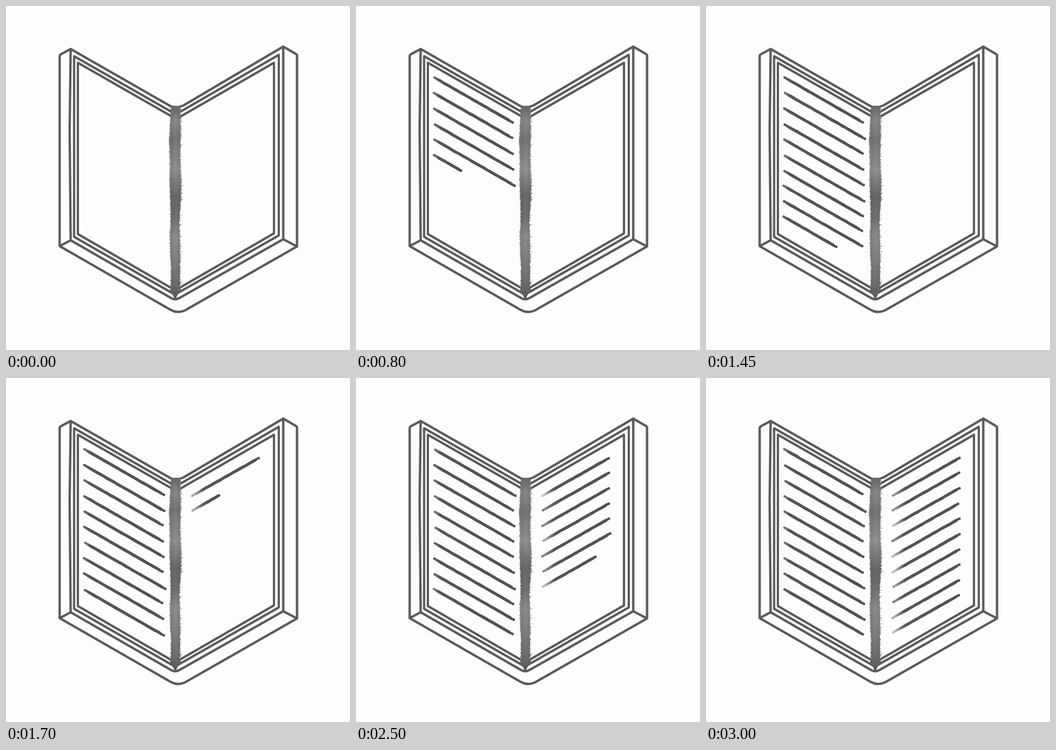
Animation of 500 by 500 pixels, one loop 3050 ms. Source, as an HTML page with a canvas:

```html
<!DOCTYPE html>
<html lang="en">
<head>
<meta charset="utf-8">
<title>Book being written</title>
<style>
  html, body { margin: 0; width: 100%; height: 100%; overflow: hidden; background: #fdfdfd; }
  canvas { display: block; width: 500px; height: 500px; }
</style>
</head>
<body>
<canvas id="stage" width="500" height="500"></canvas>
<script>
const SIZE = 500, STEP = 50, LOOP = 3050;
const PAPER = '#fdfdfd', INK = '#595959';
const ROWS = 10, STEPS_PER_LINE = 3;

const ctx = document.getElementById('stage').getContext('2d');

// Seeded random numbers from 0 to 1
function seeded(seed) {
  let s = (seed * 2654435761 + 12345) >>> 0;
  return () => {
    s = (s + 0x6D2B79F5) >>> 0;
    let t = Math.imul(s ^ (s >>> 15), s | 1);
    t ^= t + Math.imul(t ^ (t >>> 7), t | 61);
    return ((t ^ (t >>> 14)) >>> 0) / 4294967296;
  };
}

function drawCover(g) {
  g.strokeStyle = INK;
  g.lineWidth = 3.4;
  g.lineCap = g.lineJoin = 'round';
  g.stroke(new Path2D(`
    M94 62.5 L80 70 Q78 71 78 73 V349 L239 441.5 Q249 447.5 260 442.5
    L423 349.5 V73 Q423.500 70.500 421 69.500 L403 59
    M78 349 L94 340.500 M403 339 L423 349.500
    M94 62.500 L92.500 180 L94 340.500 L240 424.500 Q246 428 252 424.500
    L403 339 L403 59 L258 144.500 Q247 149.500 239 145.500 Z`));
  g.lineWidth = 3.2;
  g.stroke(new Path2D(`
    M240 153.500 L99 73 V335.500 L243 418
    M252 154.500 L396.500 71 V333.500 L249 417.500
    M240 160 L104.500 82.500 V331.500 L243 411.500
    M253 161 L389.500 82.500 V330.500 L249 411.500`));
}

function drawSpine(g) {
  const rnd = seeded(7);
  const tone = g.createLinearGradient(0, 145, 0, 425);
  [[0, 102], [.08, 138], [.17, 118], [.33, 146], [.47, 104],
   [.58, 112], [.68, 142], [.8, 128], [.92, 110], [1, 86]]
    .forEach(([p, v]) => tone.addColorStop(p, `rgb(${v},${v},${v})`));
  g.fillStyle = tone;
  for (let y = 145; y < 425; y++) {
    const mid = 246 + .5 * Math.sin(y / 19);
    const bulge = 1.3 * Math.exp(-(((y - 225) / 60) ** 2));
    const taper = Math.min(1, (426 - y) / 14, (y - 141) / 6);
    const half = (6.3 + bulge + .5 * Math.sin(y / 13)) * taper;
    const left = mid - half - rnd() * 1.6 * taper;
    const right = mid + half + rnd() * 1.8 * taper;
    g.fillRect(left, y, right - left, 1.1);
    if (rnd() < .12) g.fillRect(right + 1, y, 1, 1);
  }
  const sheen = g.createLinearGradient(238, 0, 255, 0);
  sheen.addColorStop(0, 'rgba(70,70,70,.25)');
  sheen.addColorStop(.5, 'rgba(70,70,70,0)');
  sheen.addColorStop(1, 'rgba(70,70,70,.25)');
  g.fillStyle = sheen;
  g.fillRect(239.5, 150, 13, 255);
}

function makeBook() {
  const c = document.createElement('canvas');
  c.width = c.height = SIZE;
  const g = c.getContext('2d');
  g.fillStyle = PAPER;
  g.fillRect(0, 0, SIZE, SIZE);
  drawCover(g);
  drawSpine(g);
  return c;
}

const pages = [
  { x: 114, y: 104, pitch: 22.6, slope: .573, reach: [38, 76, 115], fade: 7 },
  { x: 271.5, y: 170.5, pitch: 22.2, slope: -.566, reach: [38, 75, 96.5], fade: 17 }
];

function drawLine(n, stage, frame) {
  const rnd = seeded(frame * 41 + n * 7 + 3);
  const spread = amount => (rnd() * 2 - 1) * amount;
  const side = n < ROWS ? 0 : 1;
  const p = pages[side];
  const row = n % ROWS;
  const slide = spread(1);
  const x0 = p.x + slide + spread(.6);
  const y0 = p.y + row * p.pitch + (x0 - p.x) * p.slope + spread(.6);
  const len = p.reach[stage - 1] + spread(1.8);
  const x1 = x0 + len, y1 = y0 + len * p.slope;

  const ink = ctx.createLinearGradient(x0, y0, x1, y1);
  const soft = side ? .2 + rnd() * .45 : .55 + rnd() * .35;
  ink.addColorStop(0, `rgba(80,80,80,${soft})`);
  ink.addColorStop(p.fade / len, 'rgb(84,84,84)');
  ink.addColorStop(1, 'rgb(80,80,80)');
  ctx.fillStyle = ink;

  // Brush shape: narrow at the start, full width after a few pixels
  const top = [], bottom = [];
  for (let i = 0; i <= 24; i++) {
    const d = len * i / 24;
    const half = 1.7 + .65 * Math.min(1, d / p.fade);
    const cap = Math.min(1, (len - d) / 3 + .5);
    const x = x0 + d, y = y0 + d * p.slope + spread(.15);
    top.push([x, y - half * cap - rnd() * .25]);
    bottom.unshift([x, y + half * cap + rnd() * .25]);
  }
  ctx.beginPath();
  top.concat(bottom).forEach(([x, y]) => ctx.lineTo(x, y));
  ctx.closePath();
  ctx.fill();
  ctx.beginPath();
  ctx.arc(x0, y0, 1.8, 0, 7);
  ctx.arc(x1, y1, 2, 0, 7);
  ctx.fill();
}

const book = makeBook();
let shown = -1;

function render(time) {
  const frame = Math.floor((time % LOOP) / STEP);
  if (frame !== shown) {
    shown = frame;
    ctx.drawImage(book, 0, 0);
    for (let n = 0; n * STEPS_PER_LINE < frame; n++) {
      drawLine(n, Math.min(STEPS_PER_LINE, frame - n * STEPS_PER_LINE), frame);
    }
  }
}

let start = null;
function tick(now) {
  if (start === null) start = now;
  render(Math.max(0, now - start));
  requestAnimationFrame(tick);
}
render(0);
requestAnimationFrame(tick);
</script>
</body>
</html>
```
